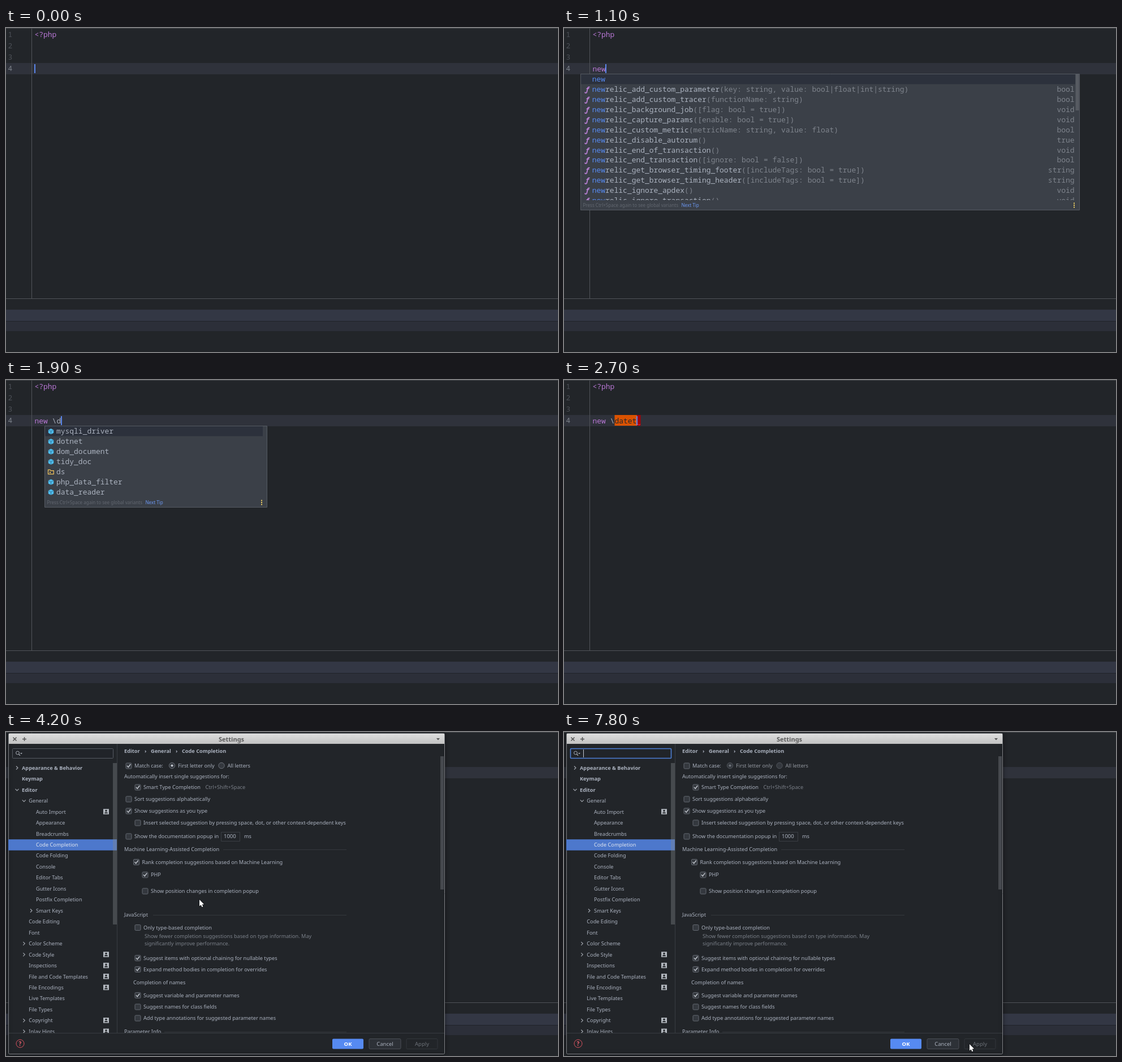
An HTML page with a canvas for the animation above (8 s loop, 976 px wide and 574 px high).

```html
<!DOCTYPE html>
<html lang="en">
<head>
<meta charset="utf-8">
<title>Code completion settings</title>
<style>
  html, body { margin: 0; width: 100%; height: 100%; overflow: hidden; background: #222529; }
  canvas { display: block; }
</style>
</head>
<body>
<canvas id="stage" width="976" height="574"></canvas>
<script>
const ctx = document.getElementById('stage').getContext('2d');
const LOOP = 8000, CHAR = 7.776, ROW = 17.93;
const MONO = '12.96px "Noto Sans Mono", monospace';
const SANS = '"Noto Sans", sans-serif';
const C = {
  bg: '#222529', line: '#515459', current: '#2f323b', text: '#abb2bf', dim: '#7b8089',
  purple: '#b877d4', blue: '#568af2', popup: '#3b4048', select: '#2c313c', yellow: '#f4c55c'
};

// Timelines: [start, value...]
const TYPED = [[0, ''], [800, 'n'], [900, 'ne'], [1000, 'new'], [1300, 'new '], [1600, 'new \\'],
  [1800, 'new \\d'], [2000, 'new \\da'], [2200, 'new \\dat'], [2300, 'new \\date'], [2700, 'new \\datet']];
const POPUP = [[0, 0], [1100, 'functions'], [1300, 0], [1400, 'classes'], [1600, 0], [1900, 'lower'], [2000, 0]];
const CARET = [[0, 1], [100, 0], [600, 1], [3600, 0]];
const MOUSE = [[3600, 600, 548], [4200, 341, 296], [4300, 340, 293], [4600, 338, 182], [4800, 321, 150],
  [4900, 289, 94], [5000, 262, 58], [5100, 251, 45], [5300, 247, 51], [5500, 242, 57], [6200, 399, 146],
  [6400, 614, 477], [6700, 650, 510], [6800, 688, 534], [6900, 710, 544], [7000, 716, 547], [7600, 716, 552]];

const FUNCTIONS = `new
newrelic_add_custom_parameter|(key: string, value: bool/float/int/string)|bool
newrelic_add_custom_tracer|(functionName: string)|bool
newrelic_background_job|([flag: bool = true])|void
newrelic_capture_params|([enable: bool = true])|void
newrelic_custom_metric|(metricName: string, value: float)|bool
newrelic_disable_autorum|()|true
newrelic_end_of_transaction|()|void
newrelic_end_transaction|([ignore: bool = false])|bool
newrelic_get_browser_timing_footer|([includeTags: bool = true])|string
newrelic_get_browser_timing_header|([includeTags: bool = true])|string
newrelic_ignore_apdex|()|void
newrelic_ignore_transaction|()|void`;

// Icon key, name, namespace
const CLASSES = `c|AppendIterator
d|Http
s|Timestamp|[Cassandra]
e|BadFunctionCallException
c|CachingIterator
c|DateTime
s|Timestamp|[MongoDB\\BSON]
d|MongoDB
s|Date|[Cassandra]
c|MongoDB
x|Mongo
c|APCIterator
c|APCUIterator`;

const LOWER = `c|mysqli_driver
c|dotnet
c|dom_document
c|tidy_doc
d|ds
c|php_data_filter
c|data_reader`;

const rows = s => s.split('\n').map(r => r.split('|'));
const LISTS = {
  functions: { x: 29, w: 883, h: 241, thumb: 64, items: rows(FUNCTIONS) },
  classes: { x: 60, w: 471, h: 241, thumb: 20, items: rows(CLASSES) },
  lower: { x: 68, w: 394, h: 144, thumb: 0, items: rows(LOWER) }
};

// Indent level, arrow (> closed, v open, - none), label, * for a project badge
const TREE = `0>Appearance & Behavior
0-Keymap
0vEditor
1vGeneral
2-Auto Import*
2-Appearance
2-Breadcrumbs
2-Code Completion
2-Code Folding
2-Console
2-Editor Tabs
2-Gutter Icons
2-Postfix Completion
2>Smart Keys
1-Code Editing
1-Font
1>Color Scheme
1>Code Style*
1-Inspections*
1-File and Code Templates*
1-File Encodings*
1-Live Templates
1-File Types
1>Copyright*
1>Inlay Hints*`.split('\n');

// Centre x, centre y, checked, label
const CHECKS = [
  [233, 98, 1, 'Smart Type Completion'],
  [217, 119, 0, 'Sort suggestions alphabetically'],
  [217, 140, 1, 'Show suggestions as you type'],
  [233, 161, 0, 'Insert selected suggestion by pressing space, dot, or other context-dependent keys'],
  [217, 185, 0, 'Show the documentation popup in'],
  [230.5, 230.5, 1, 'Rank completion suggestions based on Machine Learning'],
  [246, 253, 1, 'PHP'],
  [246, 282, 0, 'Show position changes in completion popup'],
  [233, 346.5, 0, 'Only type-based completion'],
  [233, 400.5, 1, 'Suggest items with optional chaining for nullable types'],
  [233, 420.5, 1, 'Expand method bodies in completion for overrides'],
  [233, 466.5, 1, 'Suggest variable and parameter names'],
  [233, 487, 0, 'Suggest names for class fields'],
  [233, 507, 0, 'Add type annotations for suggested parameter names']
];

const at = (list, t) => list.filter(e => e[0] <= t).pop();

function rect(x, y, w, h, color) {
  ctx.fillStyle = color;
  ctx.fillRect(x, y, w, h);
}

function box(x, y, w, h, fill, stroke, r = 0, width = 1) {
  ctx.beginPath();
  ctx.roundRect(x + .5, y + .5, w - 1, h - 1, r);
  if (fill) { ctx.fillStyle = fill; ctx.fill(); }
  if (stroke) { ctx.strokeStyle = stroke; ctx.lineWidth = width; ctx.stroke(); }
}

function path(points, { fill, stroke, width = 1, close } = {}) {
  ctx.beginPath();
  for (let i = 0; i < points.length; i += 2) ctx.lineTo(points[i], points[i + 1]);
  if (close || fill) ctx.closePath();
  if (fill) { ctx.fillStyle = fill; ctx.fill(); }
  if (stroke) { ctx.strokeStyle = stroke; ctx.lineWidth = width; ctx.stroke(); }
}

function circle(x, y, r, fill, stroke) {
  ctx.beginPath();
  ctx.arc(x, y, r, 0, 7);
  if (fill) { ctx.fillStyle = fill; ctx.fill(); }
  if (stroke) { ctx.strokeStyle = stroke; ctx.lineWidth = 1; ctx.stroke(); }
}

function write(s, x, y, color, font, align = 'left') {
  ctx.font = font;
  ctx.textAlign = align;
  ctx.fillStyle = color;
  ctx.fillText(s, x, y);
}

const mono = (s, x, y, color, align) => write(s, x, y, color, MONO, align);

// Interface text, centred vertically on y
const ui = (s, x, y, { color = C.text, size = 9.18, bold = false, align } = {}) =>
  write(s, x, y + size * .36, color, `${bold ? 'bold ' : ''}${size}px ${SANS}`, align);

function clip(x, y, w, h, draw) {
  ctx.save();
  ctx.beginPath();
  ctx.rect(x, y, w, h);
  ctx.clip();
  draw();
  ctx.restore();
}

function drawEditor(t) {
  rect(0, 0, 976, 574, C.bg);
  rect(0, 62, 976, 20, C.current);
  rect(0, 0, 976, 1, '#44474b');
  rect(45, 1, 1, 479, C.line);
  rect(0, 479, 976, 1, C.line);
  rect(0, 499, 976, 20, '#333744');
  rect(0, 519, 976, 1, '#202329');
  rect(0, 520, 976, 17, '#2c2f39');
  for (let i = 0; i < 4; i++) mono(i + 1, 3.5, 16 + 20.15 * i, i === 3 ? '#7d828b' : '#4c5057');
  mono('<?php', 50.5, 16, C.purple);

  const typed = at(TYPED, t)[1], end = 50.5 + typed.length * CHAR, error = t >= 2700;
  if (error) {
    rect(89.5, 62, 39.5, 19, '#da5200');
    rect(129, 62, 6.5, 19, '#a00409');
  }
  mono(typed.slice(0, 4), 50.5, 76.5, C.purple);
  mono(typed.slice(4, 5), 50.5 + 4 * CHAR, 76.5, C.text);
  mono(typed.slice(5), 50.5 + 5 * CHAR, 76.5, error ? '#25282d' : C.text);
  if (error) path([129, 80, 131, 78, 133, 80, 135, 78], { stroke: '#f0303a' });
  if (at(CARET, t)[1]) rect(Math.round(end - .5), 64, 2, 16, '#5b86ea');
  if (t >= 3300) drawBulb();
  const popup = at(POPUP, t)[1];
  if (popup) drawPopup(popup);
}

function drawBulb() {
  circle(61.5, 54, 4.2, '#e0555b');
  rect(59.5, 57, 4, 2, '#e0555b');
  rect(59.5, 60, 4, 1.5, '#b4b9c0');
}

function drawIcon(kind, x, y) {
  if (kind === 'd') {
    path([x - 5, y - 3.5, x - 1.5, y - 3.5, x, y - 2, x + 4.8, y - 2, x + 4.8, y + 4, x - 5, y + 4],
      { stroke: C.yellow, width: 1.2, close: true });
    rect(x - 2.5, y, 2, 2, C.yellow);
  } else if (kind === 'e') {
    path([x - 2, y - 5, x + 2.5, y - 5, x + 1, y - 1.5, x + 3.2, y - 1.5, x - 1.2, y + 5, x - .2, y + .6, x - 2.7, y + .6],
      { fill: C.yellow });
  } else {
    path([x, y - 5, x + 4.7, y - 2.6, x + 4.7, y + 2.8, x, y + 5.2, x - 4.7, y + 2.8, x - 4.7, y - 2.6], { fill: '#4fbdee' });
    path([x - 4.2, y - 2.3, x, y - .1, x + 4.2, y - 2.3], { stroke: '#2f7192', width: .9 });
    path([x, y, x, y + 5], { stroke: '#2f7192', width: .9 });
    if (kind === 's') {
      circle(x - 3, y - 2.8, 2.6, C.popup);
      for (let a = 0; a < 3; a++) {
        const dx = 2.6 * Math.cos(a * Math.PI / 3), dy = 2.6 * Math.sin(a * Math.PI / 3);
        path([x - 3 - dx, y - 2.8 - dy, x - 3 + dx, y - 2.8 + dy], { stroke: '#c3c8cf', width: .8 });
      }
    }
  }
}

function drawFunction([name, params, type], x, y, right) {
  mono(name.slice(0, 3), x, y, C.blue);
  if (!params) return;
  mono(name.slice(3), x + 3 * CHAR, y, C.text);
  mono(params.replace(/\//g, '|'), x + name.length * CHAR, y, '#7f848d');
  mono(type, right, y, '#7f848d', 'right');
  write('ƒ', x - 13, y, '#c586e2', 'italic bold 12px "Noto Sans Mono", monospace');
}

function drawClass([kind, name, space], x, y) {
  drawIcon(kind, x - 9.5, y - 4);
  mono(name, x, y, C.text);
  if (space) mono(space, x + (name.length + 1) * CHAR + 1, y, '#7f848d');
  if (kind === 'x') rect(x, y - 4.5, name.length * CHAR, 1, C.text);
}

function drawPopup(key) {
  const { x, w, h, thumb, items } = LISTS[key], foot = 81 + h - 17;
  box(x, 81, w, h + 1, C.popup, '#555a62');
  clip(x + 1, 82, w - 2, foot - 82, () => {
    rect(x + 1, 82, w - 9, 17.5, C.select);
    items.forEach((item, i) => {
      const y = 95 + ROW * i;
      if (key === 'functions') drawFunction(item, x + 20.7, y, x + w - 9.5);
      else drawClass(item, x + 21, y);
    });
    if (thumb) rect(x + w - 7.5, 82, 6, thumb, '#575b62');
  });
  ui('Press Ctrl+Space again to see global variants', x + 4.5, foot + 9, { size: 8.06, color: '#626770' });
  ui('Next Tip', x + 178.5, foot + 9, { size: 8.06, color: '#6b95ee' });
  for (let i = -1; i < 2; i++) rect(x + w - 11, foot + 8 + i * 3.5, 2, 2, '#f2d262');
}

function arrow(x, y, open) {
  path(open ? [x - 3, y - 1.5, x, y + 1.5, x + 3, y - 1.5] : [x - 1.5, y - 3, x + 1.5, y, x - 1.5, y + 3],
    { stroke: '#a0a5ad', width: 1.2 });
}

function drawTree() {
  TREE.forEach((entry, i) => {
    const level = +entry[0], y = 63.5 + 19.46 * i, chosen = i === 7;
    const x = [28, 40.3, 53][level], label = entry.slice(2).replace('*', '');
    if (chosen) rect(4, y - 9.5, 192, 19.5, '#4d78cc');
    if (entry[1] !== '-') arrow(x - 8.5, y, entry[1] === 'v');
    ui(label, x, y, { bold: level === 0, color: chosen ? '#dfe5ef' : C.text });
    if (entry.endsWith('*')) {
      rect(172, y - 5, 10, 9.5, '#b3b8bf');
      circle(177, y - 1.8, 1.7, C.bg);
      path([174, y + 3, 175, y + .8, 179, y + .8, 180, y + 3], { fill: C.bg });
    }
  });
  rect(189, 55, 7, 286, 'rgba(130,134,140,.38)');
}

function check(x, y, on, label, focus) {
  if (focus) box(x - 7, y - 7, 14, 14, '#35547f', '#4d7fc4', 3, 1.6);
  box(x - 5.5, y - 5.5, 11, 11, '#34383e', '#656a72', 1.5);
  if (on) path([x - 3, y - .2, x - .8, y + 2.4, x + 3.2, y - 3], { stroke: '#c0c5cc', width: 1.5 });
  ui(label, x + 10, y);
}

function radio(x, on, label, enabled) {
  circle(x, 59.5, 5.2, '#34383e', enabled ? '#6b7078' : '#50545a');
  if (on) circle(x, 59.5, 2.1, enabled ? '#c0c5cc' : '#6c7178');
  ui(label, x + 10.5, 59.5, { color: enabled ? C.text : '#92979f' });
}

function section(label, y, from) {
  ui(label, 209, y);
  rect(from, Math.round(y), 602 - from, 1, '#34383d');
}

function drawPage(t) {
  const off = t >= 5900;
  ui('Editor', 209, 34, { bold: true });
  ui('General', 256, 34, { bold: true });
  ui('Code Completion', 311, 34, { bold: true });
  ui('›', 245, 34, { bold: true });
  ui('›', 300, 34, { bold: true });
  if (t >= 6700 && t < 7700) ui('Reset', 767, 34, { color: '#6b95ee', align: 'right', bold: true });

  clip(197, 43, 578, 490, () => {
    check(217, 60, !off, 'Match case:', t >= 5800 && t < 7600);
    radio(293.5, true, 'First letter only', !off);
    radio(381, false, 'All letters', !off);
    ui('Automatically insert single suggestions for:', 209, 79);
    CHECKS.forEach(c => check(...c));
    ui('Ctrl+Shift+Space', 352.5, 98, { color: C.dim });
    box(380, 177, 34, 17, null, '#3a3e44');
    ui('1000', 385, 185, { size: 9.5 });
    ui('ms', 421, 185);
    section('Machine Learning-Assisted Completion', 207.7, 384);
    section('JavaScript', 323.7, 260);
    ui('Show fewer completion suggestions based on type information. May', 245, 362, { color: C.dim });
    ui('significantly improve performance.', 245, 375, { color: C.dim });
    ui('Completion of names', 225, 443.5);
    section('Parameter Info', 531, 280);
    rect(768, 43, 6, 236, '#46494e');
  });
}

function button(label, x, w, { fill = C.bg, stroke, color = C.text, bold, width = 1 }) {
  box(x, 543, w, 19, fill, stroke, 2, width);
  ui(label, x + w / 2, 552.3, { size: 9.5, align: 'center', color, bold });
}

function drawDialog(t) {
  ctx.save();
  ctx.globalAlpha = t < 3900 ? .6 : 1;
  ctx.shadowColor = 'rgba(0,0,0,.5)';
  ctx.shadowBlur = 6;
  box(4, 2, 772, 569, C.bg, '#7f8286', 2);
  ctx.shadowBlur = 0;
  ctx.shadowColor = 'transparent';

  const bar = ctx.createLinearGradient(0, 3, 0, 21);
  bar.addColorStop(0, '#dedede');
  bar.addColorStop(1, '#c2c2c2');
  rect(5, 3, 770, 18, bar);
  ui('Settings', 398.5, 12.8, { size: 11, bold: true, align: 'center', color: '#5b5b5b' });
  path([12.5, 9.5, 18.5, 15.5], { stroke: '#555', width: 1.6 });
  path([18.5, 9.5, 12.5, 15.5], { stroke: '#555', width: 1.6 });
  rect(29, 11.8, 7, 1.5, '#555');
  rect(31.8, 9, 1.5, 7, '#555');
  path([761, 11, 767, 11, 764, 14.5], { fill: '#555' });

  const search = t >= 7700;
  box(11, 29, 179, 18, '#212429', search ? '#4d7fd6' : '#565b62', 1, search ? 1.6 : 1);
  circle(20.5, 37, 2.9, null, '#a5aab2');
  path([22.5, 39.2, 25, 41.8], { stroke: '#a5aab2', width: 1.3 });
  path([25, 37, 29, 37, 27, 39.2], { fill: '#a5aab2' });
  if (t >= 7800) rect(34, 31, 1, 14, '#c5cad2');

  clip(4, 48, 192, 485, drawTree);
  rect(196, 21, 1, 512, '#383c41');
  drawPage(t);

  rect(5, 533, 770, 1, '#383c41');
  circle(25, 552, 7, null, '#d9525f');
  ui('?', 25, 552, { size: 10, bold: true, align: 'center', color: '#e8606c' });
  const ready = t >= 6700 && t < 7700, pressed = t >= 7600 && ready;
  button('OK', 576.5, 56, { fill: '#568af2', color: '#fff', bold: true });
  button('Cancel', 641.5, 57, { fill: '#2d3137', stroke: '#4b4f56' });
  button('Apply', 707.5, 56, {
    fill: ready ? '#2d3137' : C.bg,
    stroke: pressed ? '#568af2' : ready ? '#4b4f56' : '#33373c',
    color: ready ? C.text : '#6c7178',
    width: pressed ? 1.6 : 1
  });
  ctx.restore();
}

function drawMouse(t) {
  const [, left, top] = at(MOUSE, t), x = left + 1, y = top + 1;
  const shape = [x, y, x, y + 11.6, x + 2.7, y + 9.2, x + 4.5, y + 13.2, x + 6.4, y + 12.3,
    x + 4.7, y + 8.4, x + 8.2, y + 8.2];
  path(shape, { stroke: '#15171a', width: 1.6, close: true });
  path(shape, { fill: '#fff' });
}

function draw(t) {
  drawEditor(t);
  if (t >= 3800) drawDialog(t);
  if (t >= 3600) drawMouse(t);
}

const start = performance.now();
function frame() {
  draw((performance.now() - start) % LOOP);
  requestAnimationFrame(frame);
}
frame();
</script>
</body>
</html>
```
